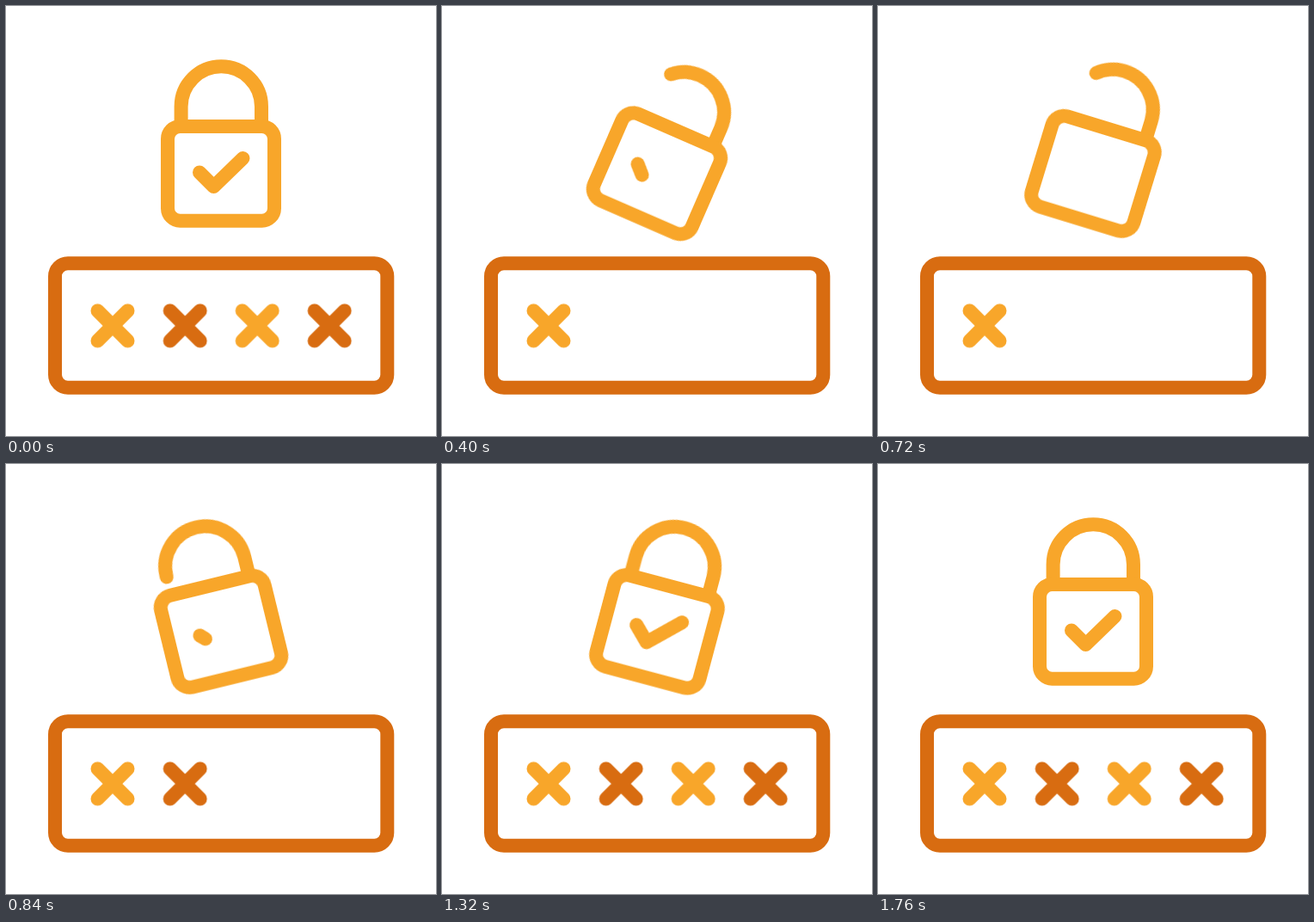
Write an HTML page that moves like this. It is 500 by 500 pixels and loops after 2000 ms.

```html
<!DOCTYPE html>
<html lang="en">
<head>
<meta charset="utf-8">
<title>Password lock</title>
<style>
  html, body { margin: 0; width: 100%; height: 100%; overflow: hidden; background: #fff; }
  svg { display: block; width: 100%; height: 100%; }

  svg * {
    animation-duration: 2s;
    animation-iteration-count: infinite;
    animation-timing-function: cubic-bezier(.333, 0, .667, 1);
  }
  .line { fill: none; stroke-width: 16; stroke-linecap: round; stroke-linejoin: round; }
  .light { stroke: #f8a62a; }
  .dark { stroke: #d86c11; }

  .lock { transform-origin: 250px 194.7px; animation-name: swing; }
  .shackle { stroke-dasharray: 100 200; animation-name: open; }
  .tick { stroke-dasharray: 100 200; animation-name: tick; }
  .tick-box { animation-name: tick-show; animation-timing-function: step-end; }
  .spark { stroke-dasharray: 0 300; animation-name: spark; }
  .sparks { animation-name: sparks-show; animation-timing-function: step-end; }
  .key { animation-timing-function: step-end; }
  .k1 { animation-name: k1; }
  .k2 { animation-name: k2; }
  .k3 { animation-name: k3; }
  .k4 { animation-name: k4; }

  /* damped swing */
  @keyframes swing {
    0%, 4% { transform: rotate(0deg); }
    30% { transform: rotate(35deg); }
    46.67% { transform: rotate(-25deg); }
    66.5% { transform: rotate(15deg); }
    80% { transform: rotate(-5deg); }
    88%, 100% { transform: rotate(0deg); }
  }
  @keyframes open {
    0%, 1% { stroke-dashoffset: 0; }
    30% { stroke-dashoffset: -44; }
    48%, 100% { stroke-dashoffset: 0; }
  }
  @keyframes tick {
    0% { stroke-dashoffset: 0; }
    28%, 39% { stroke-dashoffset: 100; }
    54%, 100% { stroke-dashoffset: 0; }
  }
  @keyframes tick-show {
    0% { opacity: 1; }
    27.9% { opacity: 0; }
    39.1%, 100% { opacity: 1; }
  }
  @keyframes spark {
    0%, 46.5% { stroke-dasharray: 0 300; stroke-dashoffset: 0; }
    51% { stroke-dasharray: 100 300; stroke-dashoffset: 0; }
    58.9%, 100% { stroke-dasharray: 100 300; stroke-dashoffset: -100; }
  }
  @keyframes sparks-show {
    0% { opacity: 0; }
    46.6% { opacity: 1; }
    58.8%, 100% { opacity: 0; }
  }
  @keyframes k1 { 0% { opacity: 1; } 25% { opacity: 0; } 33%, 100% { opacity: 1; } }
  @keyframes k2 { 0% { opacity: 1; } 19% { opacity: 0; } 40.5%, 100% { opacity: 1; } }
  @keyframes k3 { 0% { opacity: 1; } 13% { opacity: 0; } 48%, 100% { opacity: 1; } }
  @keyframes k4 { 0% { opacity: 1; } 6.5% { opacity: 0; } 55.5%, 100% { opacity: 1; } }
</style>
</head>
<body>
<svg viewBox="0 0 500 500">
  <defs>
    <path id="cross" d="M-17.5-17.5 17.5 17.5M17.5-17.5-17.5 17.5"/>
  </defs>

  <rect class="line dark" x="57" y="299.3" width="386.3" height="144.5" rx="15"/>
  <g class="line">
    <use class="key k1 light" href="#cross" x="124" y="371.8"/>
    <use class="key k2 dark" href="#cross" x="208.2" y="371.8"/>
    <use class="key k3 light" href="#cross" x="292.2" y="371.8"/>
    <use class="key k4 dark" href="#cross" x="376.2" y="371.8"/>
  </g>

  <g class="line light lock">
    <path class="shackle" pathLength="100" d="M203.6 140V117a46.7 46.7 0 0 1 93.4 0V140"/>
    <rect x="188" y="140" width="124" height="109.7" rx="14.5"/>
    <g class="tick-box">
      <path class="tick" pathLength="100" d="M225 193.5 241.5 210 275.5 177"/>
    </g>
  </g>

  <!-- drawn from the lock outwards -->
  <g class="line light sparks">
    <path class="spark" pathLength="100" d="M131.5 103 110.5 90.5"/>
    <path class="spark" pathLength="100" d="M130 145.5H105"/>
    <path class="spark" pathLength="100" d="M131.5 184.5 107.5 192"/>
  </g>
</svg>
</body>
</html>
```
